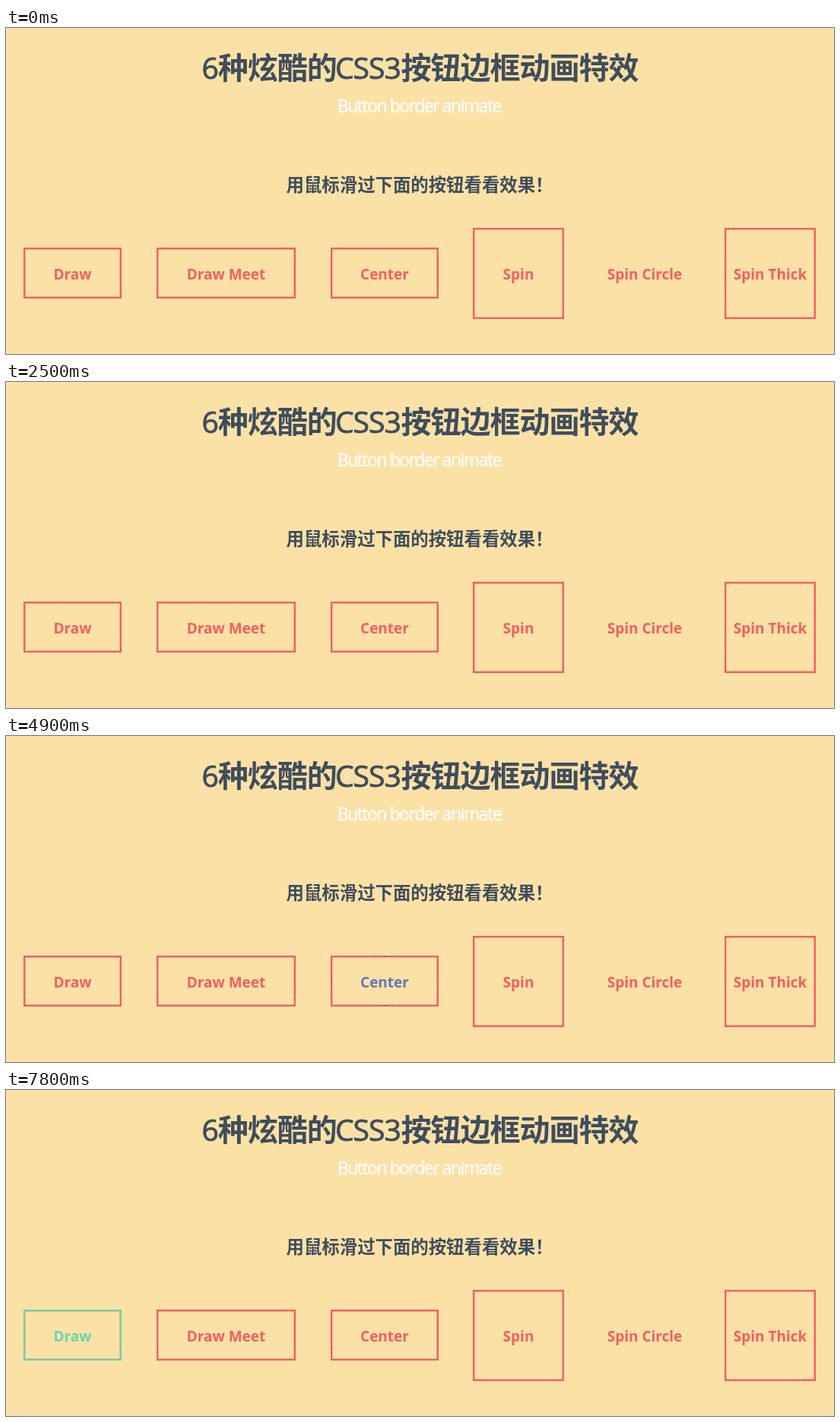
These frames come from a looping animation (1089x429 px, 8000 ms). An HTML page:

```html
<!DOCTYPE html>
<html lang="zh">
<head>
<meta charset="utf-8">
<title>Button borders</title>
<style>
  html, body { margin: 0; width: 100%; height: 100%; overflow: hidden; background: #fce1a7; }
  svg { display: block; width: 100vw; height: 100vh; isolation: isolate; }
  text { font-family: "Open Sans", "Noto Sans", sans-serif; }
  .cjk { font-family: "Noto Sans CJK SC", "Noto Sans CJK", sans-serif; font-weight: 700; }
  .title { font-size: 40px; letter-spacing: -1px; fill: #3f4d5c; }
  .latin { font-size: 39px; stroke: #3f4d5c; stroke-width: .9px; }
  .sub { font-size: 23px; letter-spacing: -1.48px; fill: #fff; stroke: #fff; stroke-width: .35px; }
  .hint { font-size: 23.4px; fill: #3f4d5c; }
  .label { font-size: 19px; font-weight: 700; text-anchor: middle; }
  .dodge { mix-blend-mode: color-dodge; }
</style>
</head>
<body>
<svg viewBox="0 0 1089 429">
  <rect width="1089" height="429" fill="#fce1a7"/>
  <text class="title" y="67"><tspan class="latin" x="257.5">6</tspan><tspan class="cjk" x="278.8">种炫酷的</tspan><tspan class="latin" x="433">CSS3</tspan><tspan class="cjk" x="519.5">按钮边框动画特效</tspan></text>
  <text class="sub" x="435.8" y="111">Button border animate</text>
  <text class="hint cjk" x="368.6" y="214.5">用鼠标滑过下面的按钮看看效果！</text>
  <g id="row"></g>
</svg>
<script>
const LOOP = 8000, STEP = 100, RED = '#f45e61';

// x, y, w, h: box; on, off: hover span in ms
const buttons = [
  { label: 'Draw', x: 23, y: 289, w: 129, h: 67, on: 6790, off: LOOP, color: '#60daaa', art: draw, fade: true },
  { label: 'Draw Meet', x: 198, y: 289, w: 183, h: 67, on: 5790, off: 6760, color: '#fbca67', art: meet, fade: true },
  { label: 'Center', x: 427, y: 289, w: 142, h: 67, on: 4875, off: 5700, color: '#6477b9', art: center },
  { label: 'Spin', x: 614, y: 263, w: 120, h: 120, on: 3782, off: 4800, color: '#0eb7da', art: spin },
  { label: 'Spin Circle', x: 780, y: 263, w: 120, h: 120, on: 2650, off: 3700, color: '#0eb7da', art: circle, bare: true },
  { label: 'Spin Thick', x: 945, y: 263, w: 120, h: 120, on: 1450, off: 2500, color: '#fff', art: thick }
];

const clamp = v => Math.min(1, Math.max(0, v));
const part = (t, delay, length) => clamp((t - delay) / length);

function bezier(x1, y1, x2, y2) {
  const at = (a, b, u) => 3 * a * u * (1 - u) ** 2 + 3 * b * u * u * (1 - u) + u ** 3;
  return x => {
    if (x <= 0 || x >= 1) return clamp(x);
    let lo = 0, hi = 1;
    for (let i = 0; i < 24; i++) {
      const mid = (lo + hi) / 2;
      if (at(x1, x2, mid) < x) lo = mid; else hi = mid;
    }
    return at(y1, y2, lo);
  };
}
const ease = bezier(.25, .1, .25, 1);
const easeOut = bezier(0, 0, .58, 1);

const line = (d, color) => `<path d="${d}" fill="none" stroke="${color}" stroke-width="2"/>`;
const shape = (d, color, extra) => `<path d="${d}" fill="${color}" ${extra}/>`;

// Border length growing from its 4px minimum
const grow = (t, delay, full) => Math.max(4, full * easeOut(part(t, delay, 250)));

const topRight = (w, h, color) => line(`M0 1H${w - 1}V${h}`, color);
const bottomLeft = (w, h, color) => line(`M1 0V${h - 1}H${w}`, color);

function draw(b, t) {
  let out = topRight(grow(t, 0, b.w), grow(t, 250, b.h), b.color);
  if (t >= 500) {
    const w = grow(t, 500, b.w), h = grow(t, 750, b.h);
    out += `<g transform="translate(${b.w - w} ${b.h - h})">${bottomLeft(w, h, b.color)}</g>`;
  }
  return out;
}

function meet(b, t) {
  return topRight(grow(t, 0, b.w), grow(t, 250, b.h), b.color) +
    bottomLeft(grow(t, 250, b.w), grow(t, 0, b.h), b.color);
}

function center(b, t) {
  const k = ease(part(t, 0, 500)), cx = b.w / 2, cy = b.h / 2;
  const dx = cx * k, dy = cy * k;
  return line(`M${cx - dx} 1h${2 * dx}M${cx - dx} ${b.h - 1}h${2 * dx}`, b.color) +
    line(`M1 ${cy - dy}v${2 * dy}M${b.w - 1} ${cy - dy}v${2 * dy}`, b.color);
}

// Three sides fade in while a fourth swings round to the left
function swing(t, side, sweep, color, cls = '') {
  let out = '';
  for (let i = 0; i < 3; i++) {
    out += shape(side, color, `transform="rotate(${90 * i})" opacity="${part(t, 100 * i, 150)}"`);
  }
  const last = t < 350 ? sweep : side;
  out += shape(last, color, `class="${cls}" transform="rotate(${270 * part(t, 0, 400)})"`);
  return `<g transform="translate(60 60)">${out}</g>`;
}

const edge = (w, left) => `M-60-60H60L${60 - w} ${w - 60}H${left - 60}Z`;

function spin(b, t) {
  return swing(t, edge(2, 2), edge(2, 0), b.color);
}

function circle(b, t) {
  const o = 60 * Math.SQRT1_2, i = 58 * Math.SQRT1_2;
  const arc = `M${-o} ${-o}A60 60 0 0 1 ${o} ${-o}L${i} ${-i}A58 58 0 0 0 ${-i} ${-i}Z`;
  const taper = `M-60 0A60 60 0 0 1 ${o} ${-o}L${i} ${-i}A58 58 0 0 0 0-58A60 58 0 0 0-60 0Z`;
  return swing(t, arc, taper, b.color);
}

function thick(b, t) {
  const fill = t >= 400 ? `<rect width="120" height="120" fill="${RED}"/>` : '';
  return fill + swing(t, edge(60, 60), edge(60, 0), RED, 'dodge');
}

function mix(a, b, k) {
  const ch = (c, i) => parseInt(c.slice(i, i + 2), 16);
  return `rgb(${[1, 3, 5].map(i => Math.round(ch(a, i) + (ch(b, i) - ch(a, i)) * k))})`;
}

function textColor(b, t) {
  if (b.fade) {
    const k = ease(part(t, b.on, 250)) * (1 - ease(part(t, b.off, 250)));
    return mix(RED, b.color, k);
  }
  return t >= b.on && t < b.off ? b.color : RED;
}

function button(b, t) {
  const art = t >= b.on && t < b.off ? b.art(b, t - b.on) : '';
  const frame = b.bare ? '' :
    `<rect x="1.2" y="1.2" width="${b.w - 2.4}" height="${b.h - 2.4}" fill="none" stroke="${RED}" stroke-width="2.4"/>`;
  const layers = b.art === thick ? art + frame : frame + art;
  return `<g transform="translate(${b.x} ${b.y})">${layers}</g>` +
    `<text class="label" x="${b.x + b.w / 2}" y="331.2" fill="${textColor(b, t)}">${b.label}</text>`;
}

const row = document.getElementById('row');
let shown = -1;

function render(ms) {
  // The picture advances ten times a second
  const t = Math.floor(ms % LOOP / STEP) * STEP;
  if (t === shown) return;
  shown = t;
  row.innerHTML = buttons.map(b => button(b, t)).join('');
}

const start = performance.now();
function tick() {
  render(performance.now() - start);
  requestAnimationFrame(tick);
}
tick();
</script>
</body>
</html>
```
